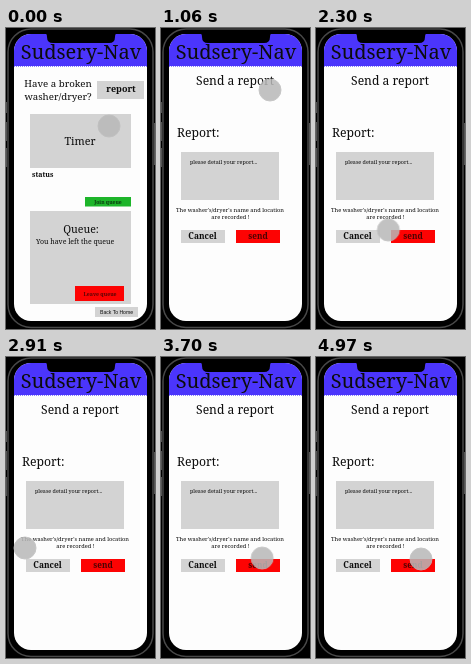
Recreate the animation shown at these times as an HTML page. Size 149 by 301 pixels, loop 5000 ms.

```html
<!DOCTYPE html>
<html lang="en">
<head>
<meta charset="utf-8">
<title>Laundry report</title>
<style>
  html, body { margin: 0; width: 100%; height: 100%; overflow: hidden; background: #000; }
  svg { display: block; width: 149px; height: 301px; }
  text { font: 9.7px "Noto Serif", "Liberation Serif", serif; fill: #0c0c0c; }
  .mid { text-anchor: middle; }
  .bold { font-weight: 700; }
  .panel { fill: #d3d3d3; }
  .green { fill: #1db52a; }
  .red { fill: #fd0303; }

  #home { animation: leave 5s linear infinite; }
  #form { animation: enter 5s linear infinite; }
  #cursor { animation: move 5s linear infinite; }

  @keyframes leave {
    0%, 17.6% { opacity: 1; }
    21.2%, 100% { opacity: 0; }
  }
  @keyframes enter {
    0%, 17.6% { opacity: 0; }
    21.2%, 100% { opacity: 1; }
  }
  @keyframes move {
    0% { transform: translate(103px, 98px); animation-timing-function: ease-in-out; }
    11.6%, 31.6% { transform: translate(109px, 62px); animation-timing-function: ease-in; }
    33.2% { transform: translate(95px, 120px); }
    34.6% { transform: translate(77px, 190px); animation-timing-function: ease-out; }
    39% { transform: translate(77px, 205px); }
    43% { transform: translate(77px, 203px); animation-timing-function: ease-in-out; }
    58.2% { transform: translate(19px, 191px); animation-timing-function: ease-in-out; }
    64.8% { transform: translate(31px, 196px); animation-timing-function: ease-in-out; }
    74% { transform: translate(101px, 201px); animation-timing-function: ease-out; }
    78% { transform: translate(117px, 206px); animation-timing-function: ease-in-out; }
    86.6% { transform: translate(35px, 202px); animation-timing-function: ease-out; }
    88.4% { transform: translate(30px, 199px); animation-timing-function: ease-in-out; }
    97% { transform: translate(91px, 201px); animation-timing-function: ease-out; }
    99.4%, 100% { transform: translate(105px, 202px); }
  }
</style>
</head>
<body>
<svg viewBox="0 0 149 301">
  <defs>
    <clipPath id="screen"><rect x="8" y="6" width="133" height="287" rx="17"/></clipPath>
  </defs>

  <!-- phone and header -->
  <rect width="149" height="301"/>
  <path d="M.5 74v11M.5 94v19M.5 120v19M148.5 95v42" stroke="#555"/>
  <rect x="2" y="1" width="145" height="298.5" rx="23" fill="none" stroke="#484848" stroke-width="1.5"/>
  <g clip-path="url(#screen)">
    <rect x="8" y="6" width="133" height="287" fill="#fdfdfd"/>
    <rect x="8" y="6" width="133" height="32" fill="#4b35fc"/>
    <path d="M8 38.5H141" stroke="#8d82ff" stroke-dasharray="1 1"/>
  </g>
  <path d="M38 5h74q-3 0-3 4q0 6-6 6H47q-6 0-6-6q0-4-3-4z"/>
  <text class="mid" x="75" y="31" style="font-size:20px">Sudsery-Nav</text>

  <g id="home">
    <text class="mid" x="52" y="59">Have a broken</text>
    <text class="mid" x="52" y="71.5">washer/dryer?</text>
    <rect class="panel" x="91" y="53" width="47" height="18"/>
    <text class="mid bold" x="115" y="63.5" style="font-size:9px">report</text>
    <rect class="panel" x="24" y="86" width="101" height="54"/>
    <text class="mid" x="74" y="117" style="font-size:10.8px">Timer</text>
    <text class="bold" x="26" y="149" style="font-size:7px">status</text>
    <rect class="green" x="79" y="169" width="46" height="9.5"/>
    <text class="mid bold" x="102" y="176" style="font-size:5.1px;fill:#0a3d10">Join queue</text>
    <rect class="panel" x="24" y="183" width="101" height="93"/>
    <text class="mid" x="75" y="205" style="font-size:10.6px">Queue:</text>
    <text x="30" y="216" style="font-size:7px">You have left the queue</text>
    <rect class="red" x="69" y="258" width="49" height="15"/>
    <text class="mid bold" x="94" y="268" style="font-size:5.2px;fill:#5a0505">Leave queue</text>
    <rect class="panel" x="89" y="279" width="43" height="10"/>
    <text class="mid" x="110.5" y="286" style="font:5.1px 'Liberation Sans',sans-serif">Back To Home</text>
  </g>

  <g id="form">
    <text class="mid" x="74" y="57" style="font-size:12.1px">Send a report</text>
    <text x="16" y="109" style="font-size:12.2px">Report:</text>
    <rect class="panel" x="20" y="124" width="98" height="48"/>
    <text x="29" y="136" style="font-size:5.4px">please detail your report...</text>
    <text class="mid" x="69" y="184" style="font-size:5.7px">The washer's/dryer's name and location</text>
    <text class="mid" x="69.5" y="190.5" style="font-size:5.7px">are recorded !</text>
    <rect class="panel" x="20" y="202" width="44" height="13"/>
    <text class="mid bold" x="41.5" y="211" style="font-size:8.4px">Cancel</text>
    <rect class="red" x="75" y="202" width="44" height="13"/>
    <text class="mid bold" x="97" y="211" style="font-size:8.2px;fill:#4c0303">send</text>
  </g>

  <circle id="cursor" r="11" fill="#b9b9b9" stroke="#bcbcbc" opacity=".86"/>
</svg>
</body>
</html>
```
